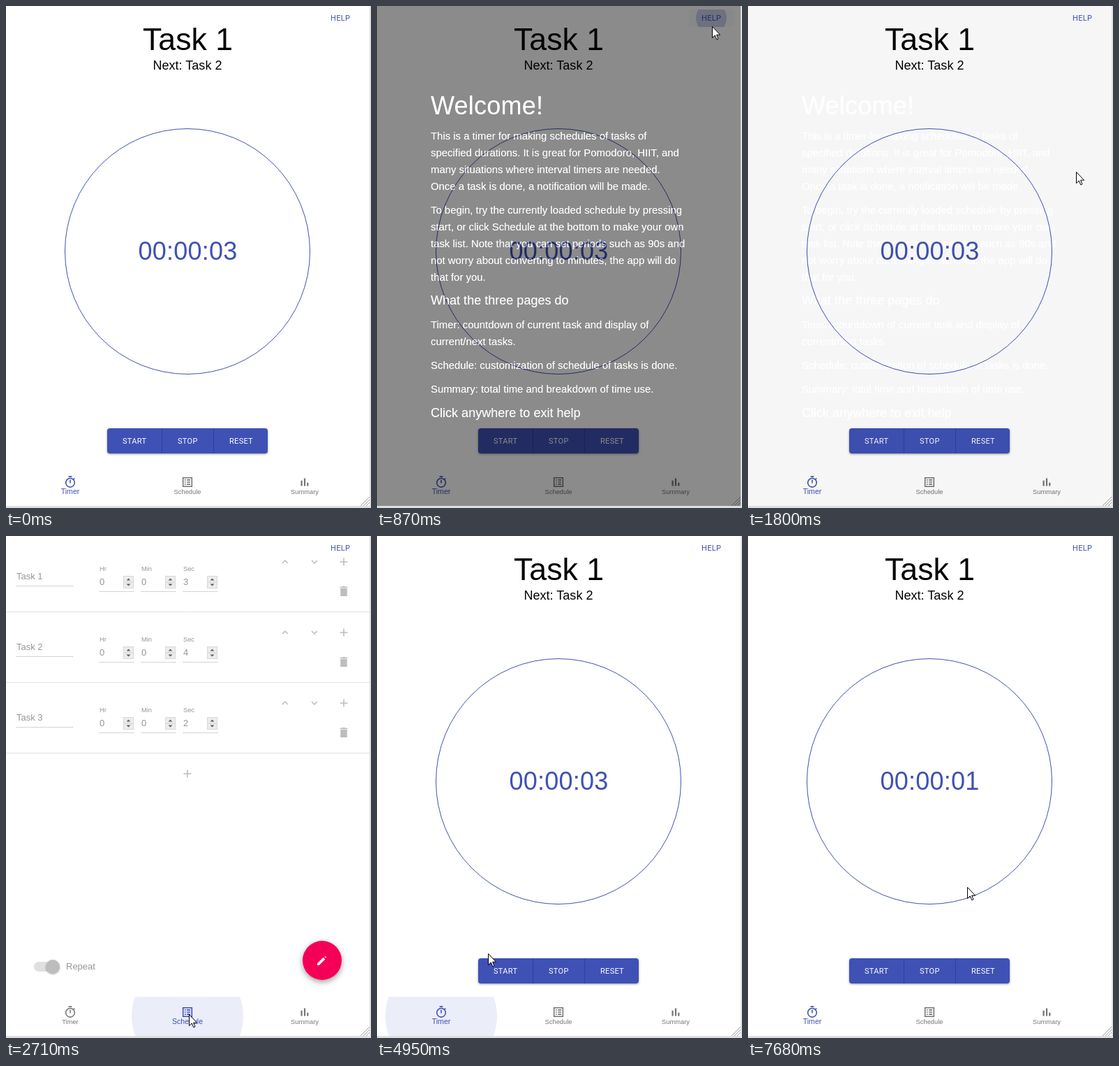
An HTML page that plays this animation: 523x718 px, repeating every 8 s.

```html
<!DOCTYPE html>
<html lang="en">
<head>
<meta charset="utf-8">
<title>Task timer</title>
<style>
  html, body { margin: 0; width: 100%; height: 100%; overflow: hidden; background: #dedede; }
  svg { display: block; width: 523px; height: 718px; }
  text { font-family: "Liberation Sans", Arial, sans-serif; white-space: pre; }
  .mid { text-anchor: middle; }
  .blue { fill: #3f51b5; }
  .big { font-size: 36px; letter-spacing: .22px; }
  .sub { font-size: 18px; letter-spacing: .02px; }
  .btn { font: 11px Roboto, "Liberation Sans", sans-serif; letter-spacing: .3px; }
  .body { font-size: 14.9px; }
  .field { font-size: 13px; fill: #969696; }
  .label { font-size: 9.3px; fill: #969696; }
  .icon { fill: none; stroke: currentColor; stroke-width: 2; }
  .solid { fill: currentColor; }
  .grey { color: #bdbdbd; }
  .white { color: #fff; fill: #fff; }
  .dots { stroke: #a8a8a8; stroke-dasharray: 1 1; }
  .tab { color: #757575; font-size: 9.3px; }
  .tab.on { color: #3f51b5; font-size: 10.6px; }
  .tab text { text-anchor: middle; fill: currentColor; }
  /* adding light keeps the words white while the shade fades */
  #help { fill: #949494; mix-blend-mode: plus-lighter; }
  #group { filter: drop-shadow(0 1.5px 1.5px rgba(0,0,0,.4)); }
  #fab { filter: drop-shadow(0 3px 4px rgba(0,0,0,.38)); }
  #thumb { filter: drop-shadow(0 1px 1px rgba(0,0,0,.3)); }
</style>
</head>
<body>
<svg id="stage" viewBox="0 0 523 718"></svg>
<script>
const icons = {
  timer: 'M4 13a8 8 0 1 0 16 0a8 8 0 1 0-16 0M9 2h6M12 8v6M18 7l2-2',
  list: 'M4 4h16v16H4zM7 8h2m2 0h6M7 12h2m2 0h6M7 16h2m2 0h6',
  bars: 'M6 10h.8v8H6zM11.6 6h.8v12h-.8zM17 14h.8v4H17z',
  up: 'M7 14.5l5-5 5 5',
  down: 'M7 9.5l5 5 5-5',
  plus: 'M5 12h14M12 5v14',
  bin: 'M5 5h14M9 4h6M7 8h10v12H7z',
  pen: 'M4 18v2h2l10-10-2-2zM17 5l2 2z'
};
const icon = (name, x, y, more = '') =>
  `<path class="icon ${more}" transform="translate(${x} ${y}) scale(.79) translate(-12 -12)" d="${icons[name]}"/>`;
const text = (x, y, cls, s, more = '') => `<text x="${x}" y="${y}" class="${cls}" ${more}>${s}</text>`;
const rect = (x, y, w, h, more = '') => `<rect x="${x}" y="${y}" width="${w}" height="${h}" ${more}/>`;
const dots = (x, y, w) => `<path class="dots" d="M${x} ${y}h${w}"/>`;
const clip = (id, shape) => `<clipPath id="${id}">${shape}</clipPath>`;

const timerPage = `<g id="timer">
  ${text(260.5, 63, 'mid', 'Task 1', 'font-size="44.6"')}
  ${text(260, 91, 'mid sub', 'Next: Task 2')}
  <circle cx="260" cy="351" r="175.5" fill="none" stroke="#3f51b5"/>
  ${text(260.5, 363, 'mid big blue', '', 'id="clock"')}
  ${rect(145, 604, 230, 36, 'rx="4" class="blue" id="group"')}
  <g clip-path="url(#startClip)">
    ${rect(145, 604, 78, 36, 'fill="#303f9f" id="startHover"')}
    <circle id="startRipple" cx="180" cy="620" fill="#fff"/>
  </g>
  <path d="M223.5 604v36M297.5 604v36" stroke="#303f9f"/>
  <g class="white">${text(167, 626, 'btn', 'START')}${text(246, 626, 'btn', 'STOP')}${text(320, 626, 'btn', 'RESET')}</g>
</g>`;

const numberField = (x, label, value) => `${text(x, 50, 'label', label)}${text(x, 70, 'field', value)}
  ${rect(x + 34.5, 57.5, 14, 17, 'fill="#ededed" stroke="#d8d8d8"')}
  <path d="M${x + 35} 66h13" stroke="#d0d0d0"/>
  <path d="M${x + 38.5} 63.5l3-3 3 3zm0 5l3 3 3-3z" fill="#606060"/>${dots(x, 79.5, 49)}`;

const row = (secs, i) => `<g class="grey" transform="translate(0 ${101 * i})">
  ${text(15, 62, 'field', 'Task ' + (i + 1))}${dots(15, 71.5, 81)}
  ${numberField(134, 'Hr', 0)}${numberField(194, 'Min', 0)}${numberField(254, 'Sec', secs)}
  ${icon('up', 400, 37)}${icon('down', 442, 37)}${icon('plus', 484, 37)}${icon('bin', 484, 79, 'solid')}
  <path d="M0 108.5h521" stroke="#e0e0e0"/></g>`;

const schedulePage = `<g id="schedule">
  ${[3, 4, 2].map(row).join('')}
  ${icon('plus', 260, 340, 'grey')}
  ${rect(40, 609, 34, 14, 'rx="7" fill="#e0e0e0"')}
  <circle id="thumb" cx="67" cy="616" r="10" fill="#bdbdbd"/>
  ${text(86, 620, 'field', 'Repeat')}
  <circle id="fab" cx="453" cy="607" r="28" fill="#f50057"/>
  ${icon('pen', 453, 607, 'white solid')}
</g>`;

const tab = (name, i) => `<g class="tab">${icon(name, 92 + 168 * i, 681)}
  ${text(92 + 168 * i, 698, '', ['Timer', 'Schedule', 'Summary'][i])}</g>`;

const paragraphs = [
  [191, 'This is a timer for making schedules of tasks of', 'specified durations. It is great for Pomodoro, HIIT, and',
    'many situations where interval timers are needed.', 'Once a task is done, a notification will be made.'],
  [297, 'To begin, try the currently loaded schedule by pressing', 'start, or click Schedule at the bottom to make your own',
    'task list. Note that you can set periods such as 90s and', 'not worry about converting to minutes, the app will do', 'that for you.'],
  [461, 'Timer: countdown of current task and display of', 'current/next tasks.'],
  [519, 'Schedule: customization of schedule of tasks is done.'],
  [553, 'Summary: total time and breakdown of time use.']
];
const helpText = `<g id="help">${text(77, 155, 'big', 'Welcome!')}
  ${paragraphs.map(([y, ...lines]) => lines.map((s, i) => text(77, y + 24 * i, 'body', s)).join('')).join('')}
  ${text(77, 427, 'sub', 'What the three pages do')}${text(77, 588, 'sub', 'Click anywhere to exit help')}</g>`;

const $ = id => document.getElementById(id);
$('stage').innerHTML = `
  ${clip('startClip', rect(145, 604, 78, 36, 'rx="4"'))}
  ${clip('helpClip', rect(447, 5, 64, 25, 'rx="4"'))}
  ${clip('navClip', rect(8, 659, 504, 56))}
  ${rect(0, 0, 521, 715, 'fill="#fff"')}
  ${timerPage}${schedulePage}
  <g class="blue" clip-path="url(#helpClip)">
    ${rect(447, 5, 64, 25, 'id="helpHover"')}<circle id="helpRipple" cx="479" cy="17"/>
  </g>
  ${text(465, 21, 'btn blue', 'HELP')}
  <g class="blue" clip-path="url(#navClip)">
    <circle id="timerRipple" cx="92" cy="687"/><circle id="scheduleRipple" cx="260" cy="687"/>
  </g>
  ${['timer', 'list', 'bars'].map(tab).join('')}
  <path d="M508 715l13-13M512 715l9-9M516 715l5-5" stroke="#a0a0a0"/>
  ${rect(0, 0, 521, 715, 'id="shade"')}
  ${helpText}
  <path id="cursor" d="M.5.5V16.5L4.3 13 6.8 18.8 9 17.8 6.6 12.2H11.6Z" fill="#fff" stroke="#000"/>`;

const TICK = 131, LEAD = 53;
const ramp = (k, from, length) => Math.min(1, Math.max(0, (k - from) / length));
const within = (k, from, to) => k >= from && k < to;

// Places the pointer rests at or turns at: tick, x, y
const path = [
  [3, 300, 420], [7, 480, 29], [9, 480, 29], [10, 470, 237], [14, 470, 237], [18, 262, 684], [22, 262, 684],
  [25, 273, 247], [26, 132, 133], [27, 178, 53], [29, 403, 180], [31, 290, 443], [34, 86, 692], [36, 86, 692],
  [38, 159, 597], [41, 180, 618], [43, 180, 618], [45, 314, 502]
];
function pointer(k) {
  const i = path.findLastIndex(p => p[0] <= k);
  const [from, x, y] = path[i], [to, nextX, nextY] = path[i + 1] || [from + 1, x, y];
  const u = ramp(k, from, to - from);
  return [x + (nextX - x) * u, y + (nextY - y) * u];
}

const set = (id, attrs) => { for (const name in attrs) $(id).setAttribute(name, attrs[name]); };
const show = (id, opacity) => set(id, { opacity });
const ripple = (id, k, from, size, strength, life) => set(id, {
  r: size * ramp(k, from, 3),
  opacity: strength * (1 - ramp(k, from + 3, life - 3))
});
const tabs = document.querySelectorAll('.tab');
const start = performance.now();

function draw() {
  const k = Math.floor(((performance.now() - start) % 8000 + LEAD) / TICK);
  const schedule = ramp(k, 18, 3) * (1 - ramp(k, 35, 3));
  const help = ramp(k, 6, 1.1) * (1 - ramp(k, 13, 1.08));

  show('schedule', schedule);
  show('timer', 1 - schedule);
  show('shade', help / 2);
  show('help', help);
  show('helpHover', within(k, 6, 9) ? .04 : 0);
  show('startHover', within(k, 40, 44) ? 1 : 0);
  ripple('helpRipple', k, 5, 33, .25, 4);
  ripple('scheduleRipple', k, 18, 80, .1, 7);
  ripple('timerRipple', k, 35, 80, .1, 4);
  ripple('startRipple', k, 41, 60, .25, 5);

  show('cursor', k < path[0][0] ? 0 : 1);
  if (k >= path[0][0]) set('cursor', { transform: `translate(${pointer(k).map(Math.round)})` });
  $('clock').textContent = '00:00:0' + (3 - Math.max(0, Math.floor((k - 43) / 8)));
  const active = within(k, 19, 36) ? 1 : 0;
  tabs.forEach((el, i) => el.classList.toggle('on', i == active));
  requestAnimationFrame(draw);
}
draw();
</script>
</body>
</html>
```
